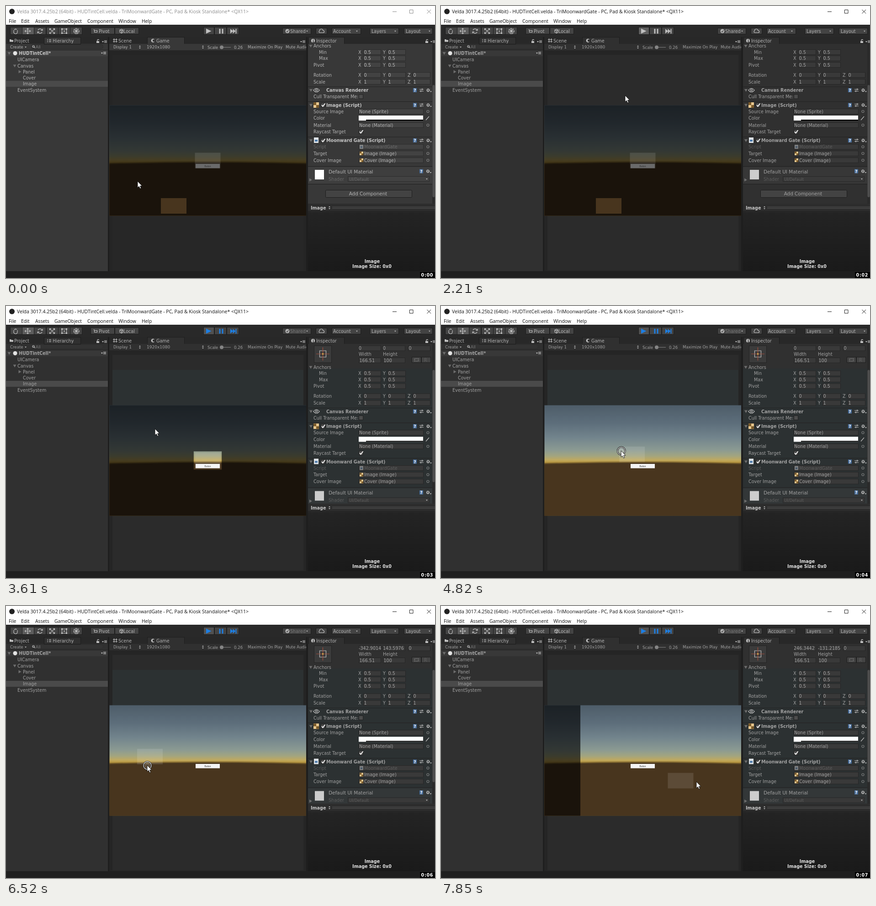
Write an HTML page that moves like this. It is 939 px wide and 596 px high and loops after 8 s.

```html
<!DOCTYPE html>
<html lang="en">
<head>
<meta charset="utf-8">
<title>Editor mask demo</title>
<style>
html,body{margin:0;width:100%;height:100%;overflow:hidden;background:#1f1f1f}
svg{display:block;width:939px;height:596px}
text{font:9.6px "DejaVu Sans",sans-serif;fill:#b4b4b4;white-space:pre}
.b{font-weight:700;fill:#c6c6c6}
.s{font-size:8.6px}
.l{font-size:10.4px}
.d{fill:#686868}
.m{font:10.3px "Open Sans",sans-serif;fill:#111}
.title{font:10.5px "Open Sans",sans-serif;fill:#111}
.panel{fill:#383838}
.field{fill:#424242;stroke:#2b2b2b}
.btn{fill:#434343;stroke:#1d1d1d}
.on{fill:#5c5c5c}
.ico{fill:none;stroke:#c0c0c0;stroke-width:1.2}
.solid{fill:#c0c0c0}
.tri{fill:#6e6e6e}
.pad{fill:#272727}
.swatch{fill:#fff}
.idle .title{fill:#8c8c8c}
.win{fill:none;stroke:#222}
.idle .win{stroke:#8c8c8c}
.pressed #playBtn{fill:#5e5e5e}
.tint .panel{fill:#303030}
.tint .pad{fill:#2b2b2b}
.tint .field{fill:#393939;stroke:#262626}
.tint .swatch{fill:#cdcdcd}
.tint .dim text{fill:#a2a2a2}
.tint .dim .d{fill:#5c5c5c}
.play .cool{fill:#2c3132}
.play .media{fill:#1d7fe4}
.play #playBtn{fill:#505050}
.play #share{fill:#777}
.edit .live{display:none}
</style>
</head>
<body>
<svg id="stage" viewBox="0 0 939 596" xmlns="http://www.w3.org/2000/svg"></svg>
<script>
const rect = (x, y, w, h, a = '') => `<rect x="${x}" y="${y}" width="${w}" height="${h}" ${a}/>`;
const box = (x, y, w, h, c, a = '') => rect(x + .5, y + .5, w - 1, h - 1, `class="${c}" ${a}`);
const fill = (x, y, w, h, c) => rect(x, y, w, h, `fill="${c}"`);
// y is the middle of the line
const text = (x, y, s, c = '', a = '') =>
  `<text x="${x}" y="${y + 3.5}" class="${c}" ${a}>${s.replace(/&/g, '&amp;').replace(/</g, '&lt;')}</text>`;
const path = (d, c = 'ico', a = '') => `<path d="${d}" class="${c}" ${a}/>`;
const down = (x, y, c = 'tri') => path(`M${x - 3.5} ${y - 2.5}h7l-3.5 6z`, c);
const right = (x, y) => path(`M${x - 2.5} ${y - 3.5}v7l6 -3.5z`, 'tri');
const drop = (x, y) => path(`M${x} ${y - 1}h4l-2 2.5z`, 'solid');
const updown = (x, y) => path(`M${x} ${y - 1}h4l-2 -2.5zm0 2h4l-2 2.5z`, 'solid');
const ring = (x, y, r) => `<circle cx="${x}" cy="${y}" r="${r}" class="ico"/>`;
const menuMark = (x, y) => path(`M${x} ${y - 1}h4l-2 3z`, 'solid') + path(`M${x + 5} ${y - 2}h6m-6 2h6m-6 2h6`, 'ico', 'stroke-width=".8"');
const lock = (x, y) => rect(x, y, 6, 4, 'class="solid"') + path(`M${x + 2} ${y}v-2a1.7 1.7 0 0 1 3.4 0`, 'ico');

function titleBar() {
  const menus = [[6, 'File'], [33, 'Edit'], [64, 'Assets'], [106, 'GameObject'], [178, 'Component'], [246, 'Window'], [297, 'Help']];
  return fill(0, 0, 939, 41, '#fff') + '<circle cx="13" cy="12" r="6" fill="#222"/>' +
    text(24, 12.5, 'Velda 3017.4.25b2 (64bit) - HUDTintCell.velda - TriMoonwardGate - PC, Pad & Kiosk Standalone* <QX11>', 'title') +
    path('M846 12.5h9M883.5 8.5h7.500v7.500h-7.500zM921.500 8l8.500 8.500m0 -8.500l-8.500 8.500', 'win') +
    menus.map(([x, s]) => text(x, 33, s, 'm')).join('');
}

function toolbar() {
  let s = fill(0, 41, 939, 27, '#292929');
  [9, 35, 61, 88, 114, 140].forEach((x, i) => s += box(x, 46, 27, 17, i === 1 ? 'btn on' : 'btn'));
  s += path('M18 56l-2 -3m3 0v-3m2 2v-3m2 3v-2m2 3v3q0 5 -4 5q-3 0 -5 -5') +
    path('M41.500 55h12M47.500 49v12M45.500 51l2 -2 2 2M45.500 59l2 2 2 -2M43.500 53l-2 2 2 2M51.500 53l2 2 -2 2') +
    path('M70 53a5 5 0 0 1 9 0M79 57a5 5 0 0 1 -9 0M80 50v3.500h-4M69 60v-3.500h4') +
    path('M96 50l10 10M106 50l-10 10M95.500 53v-3.500h3.500M103 49.500h3.500v3.500M95.500 57v3.500h3.500M106.500 57v3.500h-3.500') +
    path('M122.500 50.500h10v9h-10z') + ring(127.5, 55, 1) +
    [[121, 49], [131, 49], [121, 58], [131, 58]].map(p => rect(p[0], p[1], 3, 3, 'class="solid"')).join('') +
    path('M154 48.500v13M147.500 55h13M150 51l8 8M158 51l-8 8') + `<circle cx="154" cy="55" r="6" class="ico" stroke-dasharray="3 2"/>`;
  s += box(185, 47, 53, 15, 'btn') + box(238, 47, 53, 15, 'btn') + text(203, 55, 'Pivot') + text(257, 55, 'Local') +
    path('M193.500 53.500h6v4h-6zM192 51.500l2 2') + path('M249 52.500l4 -1.500 3 1.500v5l-3 2 -4 -2zM249 52.500l4 2 3 -2M253 54.500v5');
  s += box(432, 46, 24, 17, 'btn', 'id="playBtn"') + box(456, 46, 27, 17, 'btn') + box(483, 46, 27, 17, 'btn') +
    path('M438 49.500l11.500 5.500 -11.500 5.500z', 'solid media') + path('M466.500 50h3v10.500h-3zM472.500 50h3v10.500h-3z', 'solid media') +
    path('M491 50l6 5 -6 5.500zM496.500 50l6 5 -6 5.500zM502.500 50h2v10.500h-2z', 'solid media');
  s += [[605, 63], [678, 25], [713, 64], [796, 64], [871, 63]].map(([x, w]) => box(x, 48, w, 14, 'btn')).join('') +
    '<circle cx="616" cy="55" r="4.500" fill="#b4b4b4"/>' + path('M614 55l1.500 2 3 -4', 'ico', 'style="stroke:#333"') +
    text(622, 55, 'Shared', '', 'id="share"') + path('M686.500 58.500a2.500 2.500 0 0 1 0 -4.500a3.500 3.500 0 0 1 7 -.5a2.500 2.500 0 0 1 1 5z') +
    text(716, 55, 'Account') + text(800, 55, 'Layers') + text(875, 55, 'Layout') +
    [657, 766, 850, 925].map(x => drop(x, 55)).join('');
  return s;
}

function hierarchy() {
  const rows = [[25, 117.5, 'UICamera'], [25, 131, 'Canvas'], [37, 144, 'Panel'], [37, 157.5, 'Cover'], [37, 170.5, 'Image'], [25, 184, 'EventSystem']];
  return fill(0, 68, 223, 15, '#282828') + rect(0, 83, 223, 498, 'class="panel"') +
    box(83, 68, 81, 16, 'panel', 'stroke="#1d1d1d"') +
    path('M8 73h3l1 1.500h4v4h-8z', 'solid') + text(18, 76, 'Project') +
    path('M90 73.500h2m2 0h5M90 76h2m2 0h5M90 78.500h2m2 0h5') + text(102, 76, 'Hierarchy') +
    lock(198, 77) + menuMark(210, 78) +
    '<g class="dim">' + text(9, 89.500, 'Create', 's') + drop(41, 90) +
    box(55, 84, 158, 10, '', 'fill="#333" stroke="#2c2c2c" rx="4"') + ring(60, 88.5, 2) + path('M61.500 90l2 2') + text(65, 89, 'All', 's', 'opacity=".6"') +
    rect(0, 96, 223, 1, 'fill="#222"') + rect(0, 97, 223, 13, 'fill="#fff" opacity=".04"') +
    fill(0, 164, 223, 13, '#4a4a4a') + down(7, 103.500) + '<circle cx="20" cy="103.500" r="4.500" fill="#e4e4e4"/>' +
    text(28, 103.5, 'HUDTintCell*', 'b') + menuMark(208, 103) + down(19, 131) + right(30, 144) +
    rows.map(r => text(...r)).join('') + '</g>';
}

function game() {
  const hill = 'M226 347Q441.500 340 658 347V462H226Z';
  return fill(226, 68, 432, 15, '#282828') + box(309, 68, 82, 16, 'panel', 'stroke="#1d1d1d"') + rect(226, 83, 432, 14, 'class="panel"') +
    path('M236.500 71v9M241.500 71v9M234 73.500h10M234 78h10') + text(246, 76, 'Scene') +
    path('M325 73.500a4 4 0 1 0 0 4.500h-4v-4.500z', 'solid') + text(329, 76, 'Game') + menuMark(644, 78) +
    '<g class="dim">' + text(235, 89.500, 'Display 1', 's') + updown(291, 90) + text(308, 89.500, '1920x1080', 's', 'style="font-size:9px"') + updown(429, 90) +
    text(441, 90, 'Scale', 's') + path('M468 90.500h24', 'ico', 'opacity=".5"') + '<circle cx="472" cy="90.500" r="4" fill="#858585"/>' +
    text(499, 90, '0.26', 's') + text(529, 89.500, 'Maximize On Play', 's') + text(612, 89.500, 'Mute Audio', 's') + '</g>' +
    fill(226, 97, 432, 484, '#252525') + rect(233, 107, 418, 472, 'class="pad"') + rect(233, 140, 418, 78, 'class="pad cool"') +
    rect(226.5, 217.5, 430.5, 242, 'fill="url(#sky)"') +
    `<g clip-path="url(#view)"><path d="${hill}" fill="#48351e"/>` +
    `<path d="${hill}" fill="none" stroke="#48351e" stroke-width="7" opacity=".3"/><path d="${hill}" fill="none" stroke="#48351e" stroke-width="3.500" opacity=".45"/>` +
    fill(415, 346, 53, 9.5, '#f4f4f4') + `<text x="441.500" y="352.600" text-anchor="middle" style="font:4.800px 'Liberation Sans',sans-serif;fill:#333">Button</text>` +
    '<path id="cover" fill="#000" fill-opacity=".64" fill-rule="evenodd"/>' +
    rect(-28, -17, 56, 34, 'id="target" fill="#fff" fill-opacity=".11"') + '</g>' +
    fill(223, 68, 3, 513, '#1e1e1e');
}

const field = (x, y, w, s, c = '', a = '') => box(x, y - 6, w, 12, 'field') + text(x + 1.5, y, s, c, a);
const axes = (y, v, n) => [[771, 782, 39], [825, 835, 40], [879, 890, 39]].slice(0, n)
  .map(([x, f, w], i) => text(x, y, 'XYZ'[i]) + field(f, y, w, v)).join('');
const book = (x, y) => fill(x - 4, y - 4.5, 8, 9, '#4a6f9c') + text(x - 2.500, y, '?', 's', 'style="fill:#fff;font-weight:700"');
const gear = (x, y) => `<circle cx="${x}" cy="${y}" r="3.200" class="ico" stroke-width="2.500" stroke-dasharray="1.600 .9"/>` + ring(x, y, 2) + drop(x + 4, y + 3);
const sliders = (x, y) => path(`M${x - 4} ${y - 2}h9M${x - 4} ${y + 2}h9M${x + 2} ${y - 4}v4M${x - 1} ${y}v4`);
const tick = (x, y, on) => box(x, y - 5, 10, 10, '', 'fill="#4c4c4c" stroke="#222"') + (on ? path(`M${x + 2} ${y}l2.500 3 5 -6.500`, 'ico', 'style="stroke:#fff;stroke-width:1.800"') : '');
const checker = (x, y, n) => fill(x, y, n, n, '#e8c78e') + fill(x, y, n / 2, n / 2, '#7a5a2a') + fill(x + n / 2, y + n / 2, n / 2, n / 2, '#7a5a2a');
const head = (y, s) => rect(661, y - 8, 273, 1, 'fill="#222"') + down(667.5, y) + text(701, y, s, 'b') + book(895, y) + sliders(909, y) + gear(924, y);
const slot = (y, s, c = '', icon = '') => box(772, y - 6, 142, 12, 'field') + icon + text(icon ? 784 : 773, y, s, c) + `<circle cx="923.500" cy="${y}" r="2.500" class="ico" opacity=".55"/>`;

function details() {
  let s = '<g class="live">' + box(674, 40, 39, 38, '', 'fill="#3b3b3b" stroke="#222"') + path('M686.500 51.500h14v14h-14z') +
    path('M693.500 44v29M679 58.500h29', 'ico', 'style="stroke:#a34e3c"') + fill(692, 57, 3, 3, '#d8b04a') +
    box(772, 40, 49, 12, 'field') + box(825, 40, 49, 12, 'field') + field(880, 46, 49, '0') +
    text(772, 46, '0', '', 'id="px"') + text(825, 46, '0', '', 'id="py"') +
    text(772, 59, 'Width') + text(825, 59, 'Height') + field(772, 72.5, 49, '166.51') + field(825, 72.5, 49, '100') +
    box(888, 65, 21, 13, 'btn') + box(909, 65, 21, 13, 'btn') + path('M894.500 68.500h8v6h-8z', 'ico', 'stroke-dasharray="2 1.500" opacity=".6"') + text(915, 71.5, 'R', 'd') + '</g>';
  s += down(667, 87.500) + text(673, 87.500, 'Anchors') + text(685, 101, 'Min') + axes(101, '0.5', 2) + text(685, 114.500, 'Max') + axes(114.5, '0.5', 2) +
    text(673, 129, 'Pivot') + axes(129, '0.5', 2) + text(673, 151, 'Rotation') + axes(151, '0', 3) + text(673, 166, 'Scale') + axes(166, '1', 3);
  s += head(184.5, 'Canvas Renderer') + path('M673 184.500q6.500 -8 13 0q-6.500 8 -13 0z') + ring(679.5, 184, 2) +
    text(673, 198.500, 'Cull Transparent Me:') + tick(772, 198.500, false);
  s += head(217, 'Image (Script)') + checker(673, 211, 12) + tick(689, 217, true) +
    text(673, 231, 'Source Image') + slot(231, 'None (Sprite)') +
    text(673, 245.500, 'Color') + fill(772, 240, 141, 11, '#fff') + fill(788, 249, 125, 2, '#000') + path('M919 250l7 -8', 'ico', 'stroke-width="2"') +
    text(673, 261, 'Material') + slot(261, 'None (Material)') + text(673, 275.500, 'Raycast Target') + tick(772, 275.500, true);
  const sheet = (x, y, w, h, o) => `<g opacity="${o}">` + fill(x, y, w, h, '#dfe4e8') + fill(x + 2, y + h / 2 - 1, w - 4, h / 3, '#4a78a8') + '</g>';
  s += head(294.5, 'Moonward Gate (Script)') + sheet(674, 288, 10, 12, 1) + tick(689, 294.5, true) +
    text(673, 308.500, 'Script', 'd') + slot(308.5, 'MoonwardGate', 'd', sheet(774, 304, 8, 9, .4)) +
    text(673, 323, 'Target') + slot(323, 'Image (Image)', '', checker(774, 319, 8)) +
    text(673, 338, 'Cover Image') + slot(338, 'Cover (Image)', '', checker(774, 334, 8));
  s += fill(661, 351, 273, 1, '#222') + rect(661, 353, 273, 36, 'fill="#fff" opacity=".03"') + rect(676, 359, 20, 21, 'class="swatch"') +
    text(706, 363, 'Default UI Material', 'l') + book(909, 362) + gear(923.5, 362) + right(666.5, 381) +
    text(706, 379, 'Shader', 'd') + box(748, 373, 179, 12, 'field') + text(751, 379, 'UI/Default', 's d') + drop(919, 379) +
    fill(661, 390, 273, 1, '#222') + box(699, 403, 190, 17, 'btn', 'rx="2"') + text(792.5, 411, 'Add Component', 'l', 'text-anchor="middle"');
  return s;
}

function inspector() {
  return fill(657, 68, 282, 513, '#1e1e1e') + fill(660, 68, 279, 15, '#282828') + box(662, 68, 79, 16, 'panel', 'stroke="#1d1d1d"') +
    '<circle cx="672" cy="76" r="4" class="solid"/>' + text(671, 76, 'i', 's b', 'style="fill:#222"') + text(679, 76, 'Inspector') + lock(918, 77) + menuMark(929, 78) +
    rect(661, 83, 278, 350, 'class="panel"') + rect(661, 137, 273, 296, 'class="panel cool"') +
    '<g clip-path="url(#list)" class="dim"><g id="details">' + details() + '</g></g>' +
    fill(933, 83, 6, 350, '#2a2a2a') + rect(933.5, 173, 5, 246, 'id="thumb" rx="2.500" fill="#4e4e4e"') +
    rect(661, 433, 278, 16, 'fill="#2d2d2d"') + text(667, 442, 'Image', 'b') + updown(706, 442) +
    path('M714 440.500h225M714 443.500h225', 'ico', 'style="stroke:#555;stroke-width:1"') + rect(661, 449, 278, 132, 'fill="url(#shade)"') +
    fill(661, 449, 278, 4, '#262626') +
    text(801.5, 559.500, 'Image', 'b', 'text-anchor="middle" style="fill:#e2e2e2"') + text(801, 570.5, 'Image Size: 0x0', 'b', 'text-anchor="middle" style="fill:#e2e2e2"');
}

const stops = [[0, '#4e5d69'], [.3, '#5d6e7b'], [.55, '#73858d'], [.75, '#8b9a92'], [.85, '#a2a580'], [.92, '#c0a95e'], [.96, '#b8963f'], [1, '#6a5024']];
const stage = document.getElementById('stage');
stage.innerHTML = '<defs><linearGradient id="sky" gradientUnits="userSpaceOnUse" x1="0" y1="218" x2="0" y2="348">' +
  stops.map(([o, c]) => `<stop offset="${o}" stop-color="${c}"/>`).join('') + '</linearGradient>' +
  '<linearGradient id="shade" x2="0" y2="1"><stop stop-color="#242424"/><stop offset="1" stop-color="#1a1a1a"/></linearGradient>' +
  '<clipPath id="view">' + rect(226.5, 217.5, 430.5, 242) + '</clipPath><clipPath id="list">' + rect(661, 83, 273, 350) + '</clipPath></defs>' +
  fill(0, 0, 939, 596, '#1f1f1f') + titleBar() + toolbar() + hierarchy() + game() + inspector() + fill(0, 581, 939, 15, '#1f1f1f') +
  '<g id="press"><circle r="8.500" fill="#fff" fill-opacity=".15" stroke="#111" stroke-width="3"/><circle r="8.500" fill="none" stroke="#eee" stroke-width="1.300"/></g>' +
  '<path id="cursor" d="M0 0V14L3.200 11.200 5.500 16.200 7.700 15.200 5.500 10.300H9.800Z" fill="#fff" stroke="#000" stroke-width=".8"/>' +
  fill(906, 583, 33, 13, '#000') + text(908.5, 589.5, '0:00', 'b', 'id="clock" style="fill:#fff;letter-spacing:.7px"');

const el = id => document.getElementById(id);
const [cover, target, press, cursor, clock, px, py, list, thumb] =
  ['cover', 'target', 'press', 'cursor', 'clock', 'px', 'py', 'details', 'thumb'].map(el);

const LOOP = 8000, START = 3370, HOME = [441.5, 338.5];
const bursts = [[310, 1260, 8], [1410, 1680, 3], [1960, 2570, 6], [3370, 4250, 8], [4520, 5460, 8], [5580, 6520, 8], [6670, 7580, 8], [7730, 7850, 2]];
const track = [[0, 288, 384], [180, 288, 384], [1120, 446, 58], [1680, 446, 58], [1900, 444, 66], [2204, 403, 196], [2450, 290, 270], [2570, 262, 300],
  [3300, 262, 300], [3621, 326, 269], [4250, 417.5, 330.5], [4600, 417.5, 330.5], [4790, 394, 317], [5200, 304, 283], [5324, 302, 282], [5580, 323, 299],
  [5850, 320, 309], [6050, 320, 309], [6520, 309, 349], [6800, 309, 368], [7000, 334, 356], [7190, 335, 353], [7580, 500, 383], [7730, 544.5, 386.7], [7850, 559, 385]];
// grab, release, cursor offset, position shown afterwards
const drags = [[4600, 5324, -24, -8, '-342.9014', '143.5976'], [6050, 6800, -6, 19, '-375.3709', '-31.1573'], [7190, 7730, 20, 4, '246.3442', '-131.2185']];

function snap(t) {
  let s = 0;
  for (const [a, b, n] of bursts) {
    if (t < a) break;
    const d = (b - a) / (n - 1);
    s = t >= b ? b : a + Math.floor((t - a + 15) / d) * d;
  }
  return s;
}

function pointer(t) {
  const i = track.findIndex(k => k[0] > t);
  if (i < 0) return track[track.length - 1].slice(1);
  const a = track[i - 1], b = track[i], p = (t - a[0]) / (b[0] - a[0]);
  return [a[1] + (b[1] - a[1]) * p, a[2] + (b[2] - a[2]) * p];
}

function draw(now) {
  const t = now % LOOP, s = snap(t), live = s >= START;
  const [x, y] = pointer(s);
  let pos = HOME, freed = 3145, held = false, label = ['0', '0'];
  for (const [a, b, ox, oy, lx, ly] of drags) {
    if (s < a) break;
    const p = pointer(Math.min(s, b));
    pos = [p[0] - ox, p[1] - oy];
    held = s < b;
    if (!held) { freed = b; label = [lx, ly]; }
  }
  let hole = 'M339 421h56v34h-56z';
  if (live) {
    const e = 808 * Math.exp(-.012 * (s - freed)), w = 28 + e, h = 17 + e * 1.13;
    hole = `M${pos[0] - w} ${pos[1] - h}h${2 * w}v${2 * h}h${-2 * w}z`;
  }
  // the cover reaches past the hole at its largest so the even-odd cut stays inside
  cover.setAttribute('d', held ? '' : 'M-2000 -2000H4000V4000H-2000Z' + hole);
  target.setAttribute('transform', `translate(${pos})`);
  cursor.setAttribute('transform', `translate(${x} ${y})`);
  press.setAttribute('transform', `translate(${x + .5} ${y + .5})`);
  press.style.display = held || (s >= 1110 && s < 1260) ? '' : 'none';
  px.textContent = label[0];
  py.textContent = label[1];
  list.setAttribute('transform', `translate(0 ${live ? 46.5 : 0})`);
  thumb.setAttribute('y', live ? 140 : 173);
  clock.textContent = '0:0' + Math.floor(t / 1000);
  stage.setAttribute('class', [s < 1110 && 'idle', s >= 1110 && 'pressed', s >= 1410 && 'tint', live ? 'play' : 'edit'].filter(Boolean).join(' '));
}

const begin = performance.now();
function loop() {
  draw(performance.now() - begin);
  requestAnimationFrame(loop);
}
draw(0);
requestAnimationFrame(loop);
</script>
</body>
</html>
```
